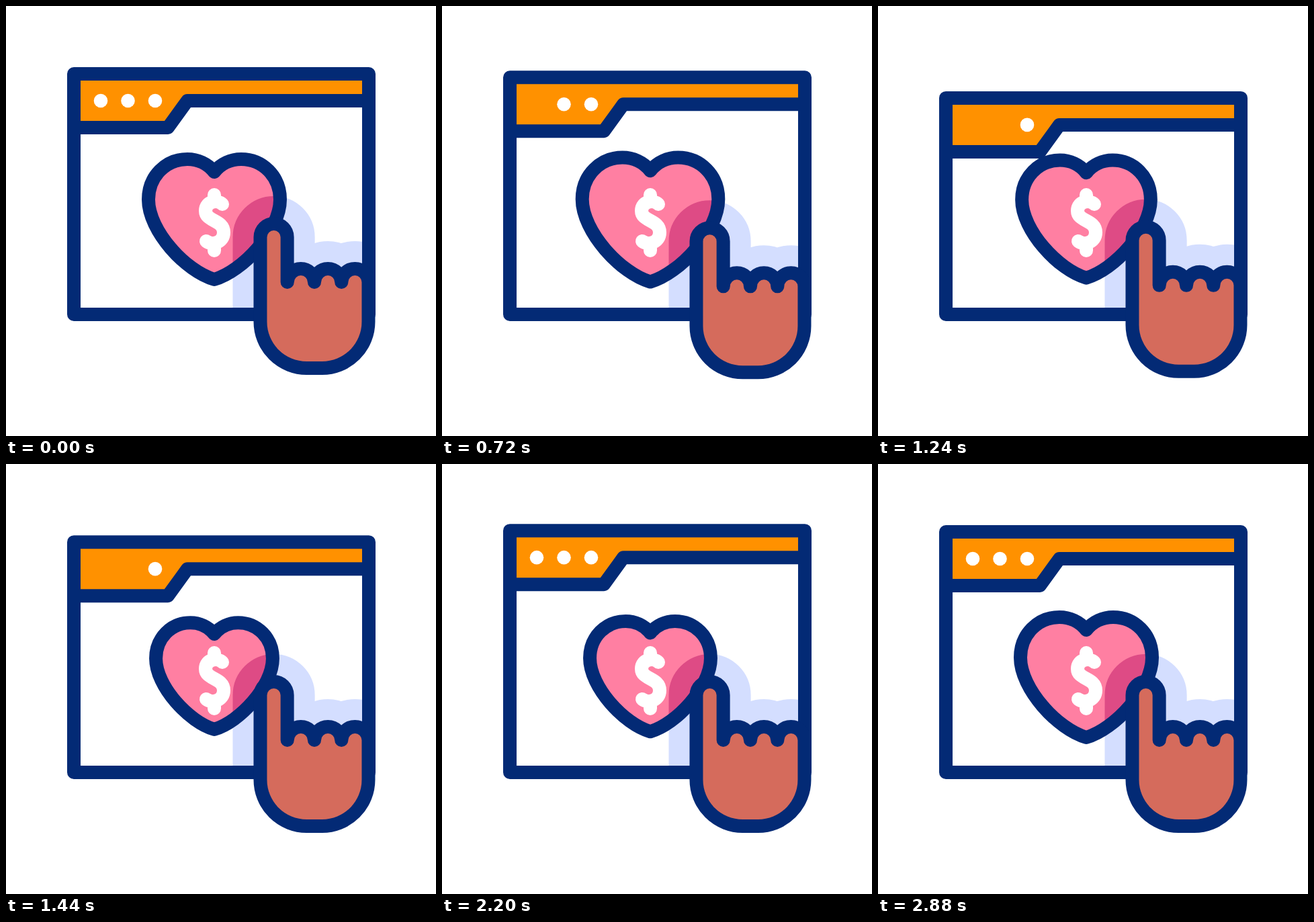
An HTML page for the animation above (3000 ms loop, 640x640 px).

```html
<!DOCTYPE html>
<html lang="en">
<head>
<meta charset="utf-8">
<title>Donate click</title>
<style>
  html, body { margin: 0; height: 100%; overflow: hidden; background: #fff; }
  svg { display: block; width: 100%; height: 100%; }
  .line { fill: none; stroke: #032a75; stroke-width: 20; stroke-linecap: round; stroke-linejoin: round; }
  .glow { stroke-width: 102; stroke-linejoin: round; }
</style>
</head>
<body>
<svg viewBox="0 0 640 640">
  <defs>
    <path id="heartShape" d="M0-53.5C-10-66-25-72.5-40-72.5C-72-72.5-98-47-98-12.5C-98 34.5-42 94.5 0 106.5C42 94.5 98 34.5 98-12.5C98-47 72-72.5 40-72.5C25-72.5 10-66 0-53.5Z" vector-effect="non-scaling-stroke"/>
    <path id="handShape"/>
    <clipPath id="inWindow"><rect x="101" y="101" width="439" height="358"/></clipPath>
    <clipPath id="inHeart"><use href="#heartShape" class="heart"/></clipPath>
  </defs>

  <g clip-path="url(#inWindow)">
    <use href="#handShape" class="hand glow" fill="#d4deff" stroke="#d4deff"/>
  </g>
  <g id="header">
    <path fill="#ff9100" d="M101 101H540V141H270L241 181H101Z"/>
    <path class="line" d="M101 181H241L270 141H540"/>
    <g id="dots" fill="#fff">
      <circle cx="141" cy="141" r="10.3"/>
      <circle cx="181.5" cy="141" r="10.3"/>
      <circle cx="222" cy="141" r="10.3"/>
    </g>
  </g>
  <path id="frame" class="line"/>

  <use href="#heartShape" class="heart" fill="#ff7fa2"/>
  <g clip-path="url(#inHeart)">
    <use href="#handShape" class="hand glow" fill="#de4b85" stroke="#de4b85"/>
  </g>
  <use href="#heartShape" class="heart line"/>
  <path fill="none" stroke="#fff" stroke-width="20" stroke-linecap="round" stroke-linejoin="round"
    d="M310 281V290M322 295C315 288 297 290 297 305C297 321 324 318 324 337C324 352 307 357 298 350M310 355V364"/>

  <g class="hand">
    <use href="#handShape" fill="#032a75" stroke="#032a75" stroke-width="40" stroke-linejoin="round"/>
    <use href="#handShape" fill="#d56b5c"/>
  </g>
</svg>
<script>
  const LOOP = 3000, STEP = 40, LAST = 2880;
  const $ = id => document.getElementById(id);
  const all = selector => [...document.querySelectorAll(selector)];

  // Each track is a list of [time, value], eased in and out between keys.
  const headerTrack = [[0, 0], [450, -13.5], [1120, 40], [1790, -13.5], [2330, 0]];
  const handTrack = [[0, 0], [300, 38], [580, 0], [960, 21], [1370, 0], [1740, 0], [1960, 21], [2180, 0]];
  const heartTrack = [[600, 1], [1000, 1.164], [1400, 0.88], [1800, 1.164], [2200, 0.918], [2880, 1]];
  const dotTracks = [
    [[640, 1], [720, 0], [1860, 0], [1940, 1]],
    [[900, 1], [1000, 0], [1600, 0], [1680, 1]],
    [[0, 1]]
  ];

  function sample(track, t) {
    const next = track.findIndex(key => key[0] > t);
    if (next === 0) return track[0][1];
    if (next < 0) return track[track.length - 1][1];
    const [t0, v0] = track[next - 1], [t1, v1] = track[next];
    const eased = (1 - Math.cos(Math.PI * (t - t0) / (t1 - t0))) / 2;
    return v0 + (v1 - v0) * eased;
  }

  // Fingertip, then alternating gaps and knuckles, then the rounded palm.
  const arc = sweep => `a10.07 10.07 0 0 ${sweep} 20.14 0`;
  $('handShape').setAttribute('d',
    `M388.5 344${arc(1)}V411${(arc(0) + arc(1)).repeat(3)}V470a59 59 0 0 1-59 59h-23a59 59 0 0 1-59-59Z`);

  const hands = all('.hand'), hearts = all('.heart'), dots = [...$('dots').children];
  const transform = (node, value) => node.setAttribute('transform', value);

  function draw(t) {
    const top = sample(headerTrack, t);
    const drop = sample(handTrack, t);
    const scale = sample(heartTrack, t);
    transform($('header'), `translate(0 ${top})`);
    $('frame').setAttribute('d', `M101 ${101 + top}H540V459H101Z`);
    hands.forEach(node => transform(node, `translate(0 ${drop})`));
    hearts.forEach(node => transform(node, `translate(310 300.5) scale(${scale})`));
    dots.forEach((dot, i) => dot.setAttribute('opacity', sample(dotTracks[i], t)));
  }

  function tick() {
    const t = performance.now() % LOOP;
    draw(Math.min(LAST, Math.floor(t / STEP) * STEP));
    requestAnimationFrame(tick);
  }
  tick();
</script>
</body>
</html>
```
